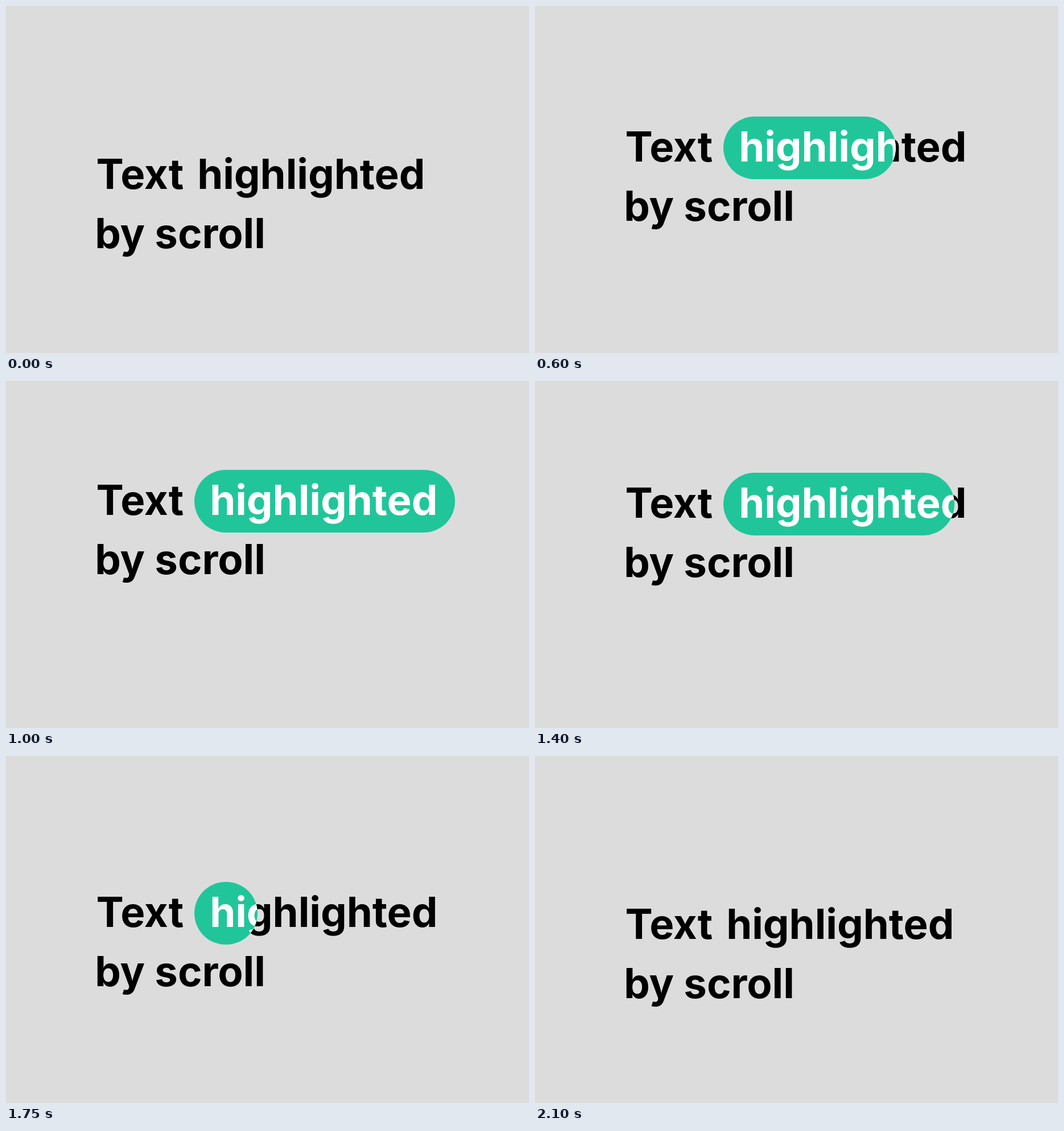
Write an HTML page that moves like this. It is 919 by 609 pixels and loops after 2150 ms.

```html
<!DOCTYPE html>
<html lang="en">
<head>
<meta charset="utf-8">
<title>Text highlighted by scroll</title>
<style>
  html, body { margin: 0; width: 100%; height: 100%; overflow: hidden; background: #dcdcdc; }
  svg { display: block; width: 919px; height: 609px; }
  text { font: 700 72.4px Inter, sans-serif; font-optical-sizing: none; }
</style>
</head>
<body>
<svg viewBox="0 0 919 609">
  <defs>
    <clipPath id="pillClip"><rect class="pill" y="156" height="110"/></clipPath>
  </defs>
  <g id="page">
    <text x="158.5" y="235">Text</text>
    <text x="156.3" y="339">by scroll</text>
    <text class="word" y="235">highlighted</text>
    <rect class="pill" y="156" height="110" fill="#20c69a"/>
    <g clip-path="url(#pillClip)">
      <text class="word" y="235" fill="#fff">highlighted</text>
    </g>
  </g>
</svg>
<script>
  const LOOP = 2150, STEP = 50;
  const SCROLL = 86, PILL_WIDTH = 458, PILL_RADIUS = 55;
  const WORD_X = 336.2, INDENT = 22, PILL_X = 335, OUTDENT = 4;

  const page = document.getElementById('page');
  const pills = document.querySelectorAll('.pill');
  const words = document.querySelectorAll('.word');

  const clamp = v => Math.min(1, Math.max(0, v));

  // Symmetric ease-in-out with an adjustable power.
  function ease(t, start, duration, power) {
    const u = clamp((t - start) / duration);
    const half = v => Math.pow(2 * v, power) / 2;
    return u < 0.5 ? half(u) : 1 - half(1 - u);
  }

  function setAll(nodes, attrs) {
    for (const node of nodes)
      for (const name in attrs) node.setAttribute(name, attrs[name]);
  }

  function draw(t) {
    const scrolled = ease(t, 160, 840, 2.4) - ease(t, 1190, 915, 2.8);
    const filled = clamp(ease(t, 147, 787, 2.4) - ease(t, 1167, 911, 2.2));
    const opened = clamp(filled / 0.1);
    const width = Math.round(PILL_WIDTH * filled);
    const radius = Math.min(PILL_RADIUS, width / 2);

    // The page scrolls by whole pixels.
    page.setAttribute('transform', `translate(0 ${Math.round(SCROLL * (1 - scrolled))})`);
    setAll(words, { x: WORD_X + INDENT * opened });
    setAll(pills, { x: Math.round(PILL_X - OUTDENT * opened), width, rx: radius, ry: radius });
  }

  const began = performance.now();
  function tick() {
    const t = (performance.now() - began) % LOOP;
    draw(Math.floor(t / STEP) * STEP);
    requestAnimationFrame(tick);
  }
  draw(0);
  requestAnimationFrame(tick);
</script>
</body>
</html>
```
